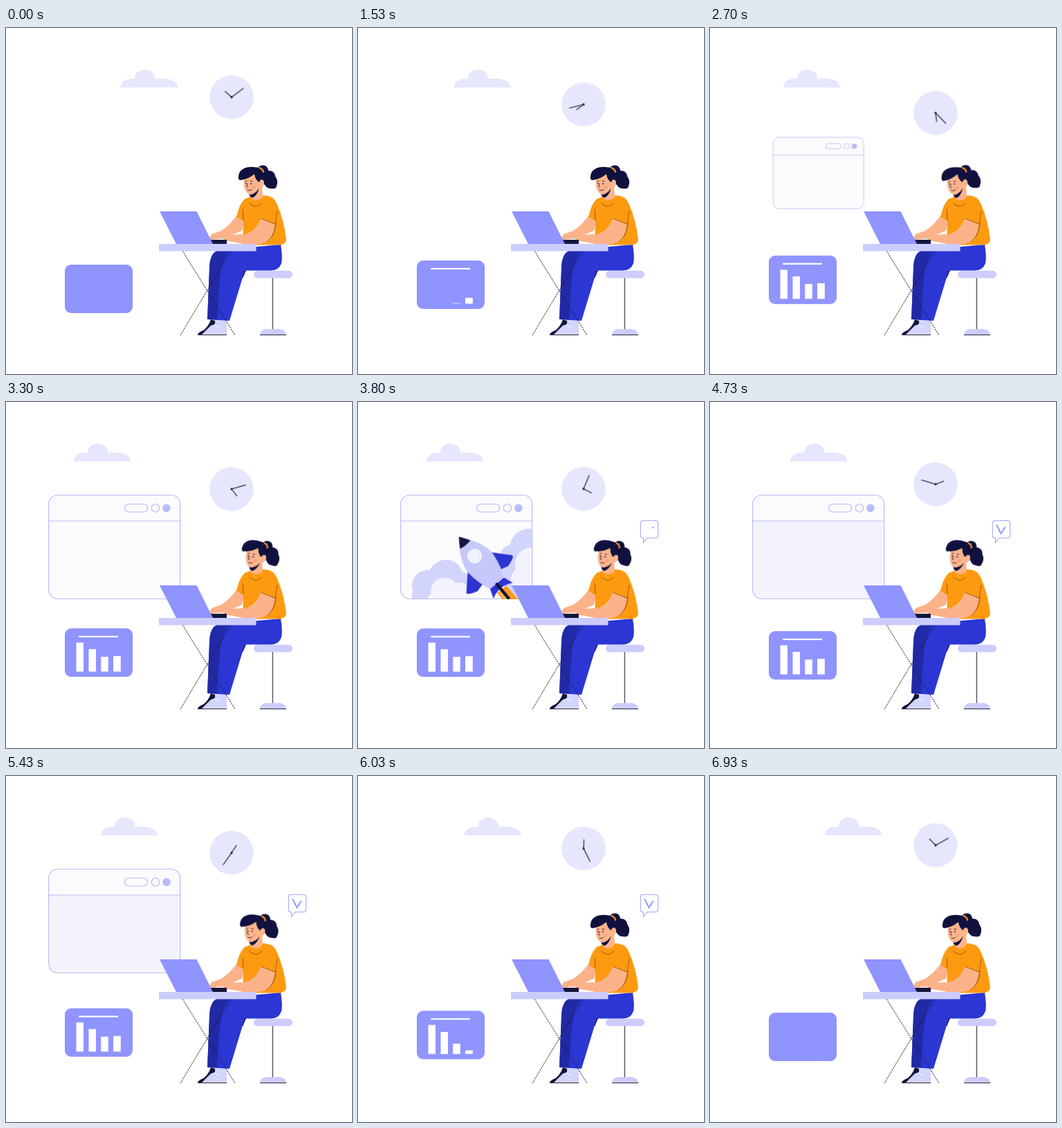
An HTML page for the animation above (7010 ms loop, 500 by 500 pixels).

```html
<!DOCTYPE html>
<html lang="en">
<head>
<meta charset="utf-8">
<title>Working at a desk</title>
<style>
html, body { margin: 0; width: 100%; height: 100%; overflow: hidden; background: #fff; }
svg { display: block; width: 100%; height: 100%; }

.loop { animation: 7.01s linear infinite both; }
.drift { animation: 3.505s cubic-bezier(.364, 0, .636, 1) infinite alternate; }

#cloud { animation-name: cloud; }
#clock { animation-name: clock; }
#card { animation-name: card; }
@keyframes cloud { to { transform: translateX(-68.5px); } }
@keyframes clock { to { transform: translateY(26px); } }
@keyframes card { to { transform: translateY(-15px); } }

.hand { transform-origin: 326px 100px; }
#hour { animation-name: hour; }
#minute { animation-name: minute; }
@keyframes hour { from { transform: rotate(312deg); } to { transform: rotate(-48deg); } }
@keyframes minute { from { transform: rotate(53deg); } to { transform: rotate(-667deg); } }

#heading { animation-name: heading; transform-origin: 105px 0; }
@keyframes heading {
  0%, 12.8% { transform: scaleX(0); animation-timing-function: ease-in-out; }
  18.5%, 89.9% { transform: none; animation-timing-function: ease-in-out; }
  95.6%, 100% { transform: scaleX(0); }
}
.bar { animation-name: bar; transform-origin: 0 404.5px; }
@keyframes bar {
  0%, 19.69% { transform: scaleY(0); animation-timing-function: ease-in-out; }
  24.68%, 82.7% { transform: none; animation-timing-function: ease-in-out; }
  87.7%, 100% { transform: scaleY(0); }
}

#window { animation-name: window; transform-origin: 156.7px 209.5px; }
@keyframes window {
  0%, 35.7% { transform: scale(0); animation-timing-function: ease-in-out; }
  40.66% { transform: scale(1.11); animation-timing-function: ease-in-out; }
  42.8%, 77.75% { transform: none; animation-timing-function: ease-in-out; }
  79.89% { transform: scale(1.11); animation-timing-function: ease-in-out; }
  84.88%, 100% { transform: scale(0); }
}

.left { transform-origin: 120px 285px; }
.right { transform-origin: 252px 285px; }
.back { animation-name: back; fill: #d2d4fc; }
.front { animation-name: front; fill: #f3f3fd; }
@keyframes back {
  0%, 48.5% { transform: scale(0); }
  54.21% { transform: none; }
  60.34% { transform: scale(2.1); }
  64.2%, 85% { transform: scale(3.2); }
  85.01%, 100% { transform: scale(0); }
}
@keyframes front {
  0%, 48.5% { transform: scale(0); }
  54.21% { transform: none; }
  60.34% { transform: scale(3.2); }
  64.2%, 85% { transform: scale(5); }
  85.01%, 100% { transform: scale(0); }
}

#rocket { animation-name: rocket; }
@keyframes rocket {
  0%, 47.79% { transform: translate(129.8px, 123.5px); }
  68.47%, 100% { transform: translate(-288.4px, -274.4px); }
}

#bubble { animation-name: bubble; transform-origin: 411px 204px; }
@keyframes bubble {
  0%, 48.5% { transform: scale(0); animation-timing-function: ease-out; }
  52.8%, 92.72% { transform: none; animation-timing-function: ease-in; }
  97.7%, 100% { transform: scale(0); }
}
#tick { animation-name: tick; stroke-dasharray: 27 40; }
@keyframes tick {
  0%, 53.9% { stroke-dashoffset: 27.1; }
  57.8%, 100% { stroke-dashoffset: 0; }
}

#head { animation-name: head; transform-origin: 362px 240px; }
@keyframes head {
  0%, 33.5% { transform: none; animation-timing-function: ease-in-out; }
  38.5% { transform: rotate(-3deg); animation-timing-function: ease-in-out; }
  47%, 74.2% { transform: rotate(11deg); animation-timing-function: ease-in; }
  77.5% { transform: rotate(5deg); animation-timing-function: ease-out; }
  80%, 100% { transform: none; }
}
</style>
</head>
<body>
<svg viewBox="0 0 500 500">
  <defs>
    <clipPath id="pane"><path d="M62 172.5H251V272Q251 284 239 284H74Q62 284 62 272Z"/></clipPath>
    <clipPath id="sky"><path d="M0 0H252V284.5H0Z"/></clipPath>
  </defs>

  <path id="cloud" class="drift" fill="#e6e7fd"
    d="M166 86C166 77 174 72 186 73.500C186 65 192 60 200.500 60S215 65 215.500 73.500C234 71 248 76 248 86Z"/>

  <g id="clock" class="drift">
    <circle cx="326" cy="100" r="31.700" fill="#e6e7fd"/>
    <g stroke="#50516e" stroke-width="1.600" stroke-linecap="round">
      <path id="hour" class="hand loop" d="M326 100V87.500"/>
      <path id="minute" class="hand loop" d="M326 100V79"/>
    </g>
    <circle cx="326" cy="100" r="1.700" fill="#2d2e50"/>
  </g>

  <!-- Chart card -->
  <g id="card" class="drift">
    <rect x="85" y="342" width="98" height="70" rx="9" fill="#8f94fe"/>
    <g fill="#fff">
      <rect id="heading" class="loop" x="105" y="352.800" width="57" height="2.200"/>
      <rect class="bar loop" x="101.500" y="362.500" width="10.500" height="42" style="animation-delay:.3s"/>
      <rect class="bar loop" x="119.500" y="372" width="10.500" height="32.500" style="animation-delay:.2s"/>
      <rect class="bar loop" x="137.300" y="383" width="10.500" height="21.500" style="animation-delay:.1s"/>
      <rect class="bar loop" x="155" y="382" width="10.800" height="22.500"/>
    </g>
  </g>

  <!-- Browser window -->
  <g id="window" class="loop">
    <rect x="61.700" y="134.500" width="190" height="150" rx="13" fill="#fbfbfd"/>
    <g clip-path="url(#pane)">
      <g class="back left loop">
        <circle cx="101" cy="266" r="23"/><circle cx="127" cy="253" r="25"/>
        <circle cx="144" cy="266" r="22"/><circle cx="96" cy="281" r="18"/>
      </g>
      <g class="back right loop">
        <circle cx="248" cy="212" r="29"/><circle cx="221" cy="222" r="15"/>
        <circle cx="226" cy="245" r="25"/><circle cx="240" cy="268" r="25"/>
      </g>
      <g class="front left loop">
        <circle cx="125" cy="274" r="20"/><circle cx="146" cy="279" r="18"/>
        <circle cx="112" cy="287" r="12"/>
      </g>
      <g class="front right loop">
        <circle cx="252" cy="235" r="25"/><circle cx="241" cy="257" r="20"/>
        <circle cx="246" cy="275" r="18"/>
      </g>
    </g>
    <g fill="none" stroke="#b9bcf6" stroke-width="1.200">
      <rect x="61.700" y="134.500" width="190" height="150" rx="13"/>
      <path d="M62 172H251.500"/>
      <rect x="171.500" y="147.500" width="33" height="11.500" rx="5.700"/>
      <circle cx="216" cy="153.300" r="5.700"/>
      <circle cx="232" cy="153.300" r="5.200" fill="#b9bcf6"/>
    </g>
  </g>

  <!-- Rocket -->
  <g clip-path="url(#sky)">
    <g id="rocket" class="loop">
      <g transform="translate(146 195) rotate(-39.400)">
        <path fill="#fd9a1c" d="M-9 98L-7.500 140L-2 136L2 143L6 138L10 142L8 98Z"/>
        <path fill="#fdb95e" d="M-7 100L-5 122L-2 114L0 100Z"/>
        <g fill="#2d34d0">
          <path d="M21 46L43 70Q43 74 28 78L14 74Z"/>
          <path d="M-21 46L-43.500 70Q-43 74 -29 78L-14 74Z"/>
          <path d="M-12 84H12L18 101Q10 96 0 96Q-10 96 -18 101Z"/>
        </g>
        <path fill="#c6c8fc" d="M0 0C13 17 23 33 22.500 50C21 66 17 78 13 87H-13C-17 78 -21 66 -22.500 50C-23 33 -13 17 0 0Z"/>
        <path fill="#15163f" d="M0 0Q6 8 9.500 14.500Q0 17 -9.500 14.500Q-6 8 0 0Z"/>
        <circle cy="36" r="10.300" fill="#fff"/>
        <circle cy="36" r="8" fill="#f3f3fd" stroke="#d0d2f5" stroke-width="1.300" stroke-dasharray="2 1.400"/>
        <path d="M-1 88V114" stroke="#11123a" stroke-width="4.400" stroke-linecap="round"/>
      </g>
    </g>
  </g>

  <!-- Speech bubble -->
  <g id="bubble" class="loop" fill="none">
    <path fill="#fff" stroke="#a3a7f7" stroke-width="1.100"
      d="M411 171.500H430.500Q433.500 171.500 433.500 174.500V193Q433.500 196.500 430.500 196.500H418L412.500 203.500V196.500H411Q408.300 196.500 408.300 193V174.500Q408.300 171.500 411 171.500Z"/>
    <path id="tick" class="loop" stroke="#9b9ff8" stroke-width="2.200" d="M426.800 180.500L420.500 190L414 177.500"/>
  </g>

  <!-- Stool -->
  <path d="M385.500 360V437" stroke="#25263f"/>
  <path fill="#cccdfc" d="M367 443.500Q368 435 377 435H395Q404 435 405 443.500Z"/>
  <path d="M367 443.500H405" stroke="#26273f"/>
  <path fill="#10113a" d="M337 350H347L342 362Z"/>
  <rect x="358" y="350.800" width="56" height="10.700" rx="5.300" fill="#cccdfc"/>

  <!-- Shoes and trousers -->
  <path fill="#12133c" d="M296 421L302 423V443.500H277Q277 440 285 437Q293 431 296 421Z"/>
  <path fill="#d4d5fc" d="M296 430L302 428L301 436L289 443H283Z"/>
  <path fill="#d4d5fc" d="M302 421H319V443.500H289Q290 438 297 435Q303 431 302 421Z"/>
  <path d="M277 443.500H319" stroke="#26273f"/>
  <path d="M301 429L308 433" stroke="#fff"/>
  <path fill="#2b36d3" d="M307 321L397 313Q400 331 398 340Q394 350.500 383 350.500H345L323 423L291 421L294 347Q295 324 307 321Z"/>
  <path fill="#2229a6" d="M300 325L322 321Q311 339 308.500 366L305 421.500L291 421L294 347Q294 333 300 325Z"/>

  <!-- Body -->
  <path fill="#fbb289" d="M334 270L345 277L341 293L315 304L296 306Q293 303 297 298L311 293Q324 285 334 270Z"/>
  <path fill="#fd9a10" d="M345 247Q359 241 373 242Q386 242 391 253Q402 278 405 306Q404 313 395 313.500H342L343 279L333 273Q337 254 345 247Z"/>
  <path fill="#fbb289" d="M356 232L370 228L371 244Q364 252 354 247Z"/>
  <path d="M351 253Q361 262 370 253M342 262L343 278" fill="none" stroke="#a45d16"/>
  <path d="M390 281Q389 300 376 309" fill="none" stroke="#b76b12" stroke-width="1.800"/>
  <path fill="#fbb289" d="M369 272L389 281Q387 302 376 309Q368 314 344 312L315 307Q312 303 319 299L344 298Q363 294 369 272Z"/>
  <path fill="#fd9a10" d="M377 248Q391 250 392 262L389 284L368 275Z"/>
  <path d="M368 275L389 283.500L392 264" fill="none" stroke="#a45d16"/>

  <!-- Head -->
  <g id="head" class="loop">
    <path fill="#10113f" d="M365 205Q364 198 371 198.500Q378 198 379 206Q388 206 389 214Q394 221 391 228Q391 233 384 232Q376 233 371 222Z"/>
    <path fill="#10113f" d="M351 238Q352 246 357 245Q364 241 366 229Z"/>
    <path fill="#fcb48b" d="M344 215Q342 228 346 235Q350 241.500 355 240.500Q362 238 365 232Q373 231 373 223Q373 216 366 213L359 208Z"/>
    <path fill="#10113f" d="M336 214C337 204 347 200 358 201Q370 201 374 209Q378 215 373 222Q371 217 367.500 220L365.500 223Q360 219 359 211Q349 219 338 220Q335 218 336 214Z"/>
    <path d="M366 202Q372 204 372 209" fill="none" stroke="#e58a1c" stroke-width="2.400"/>
    <g fill="none" stroke="#3a2545" stroke-linecap="round">
      <path d="M346 221.500L348 221M353 221L356 221.500M349 225L347.500 229L349.500 230M349 234Q353 236 355 233"/>
    </g>
    <circle cx="354" cy="225" r="1" fill="#251c40"/>
    <circle cx="347" cy="224.500" r=".9" fill="#251c40"/>
    <circle cx="358" cy="230" r="2.300" fill="#f9a27c"/>
  </g>

  <!-- Desk and laptop -->
  <path d="M255 322L331 444M325 322L252 444" stroke="#1c1d33" stroke-dasharray="2.400 1.200"/>
  <path fill="#14153c" d="M294 306H319V312H294Z"/>
  <path fill="#8f94fe" d="M222 265H275.500L299 312H246Z"/>
  <path fill="#cccdfc" d="M221 312H361.500V322.500H221Z"/>
</svg>
</body>
</html>
```
